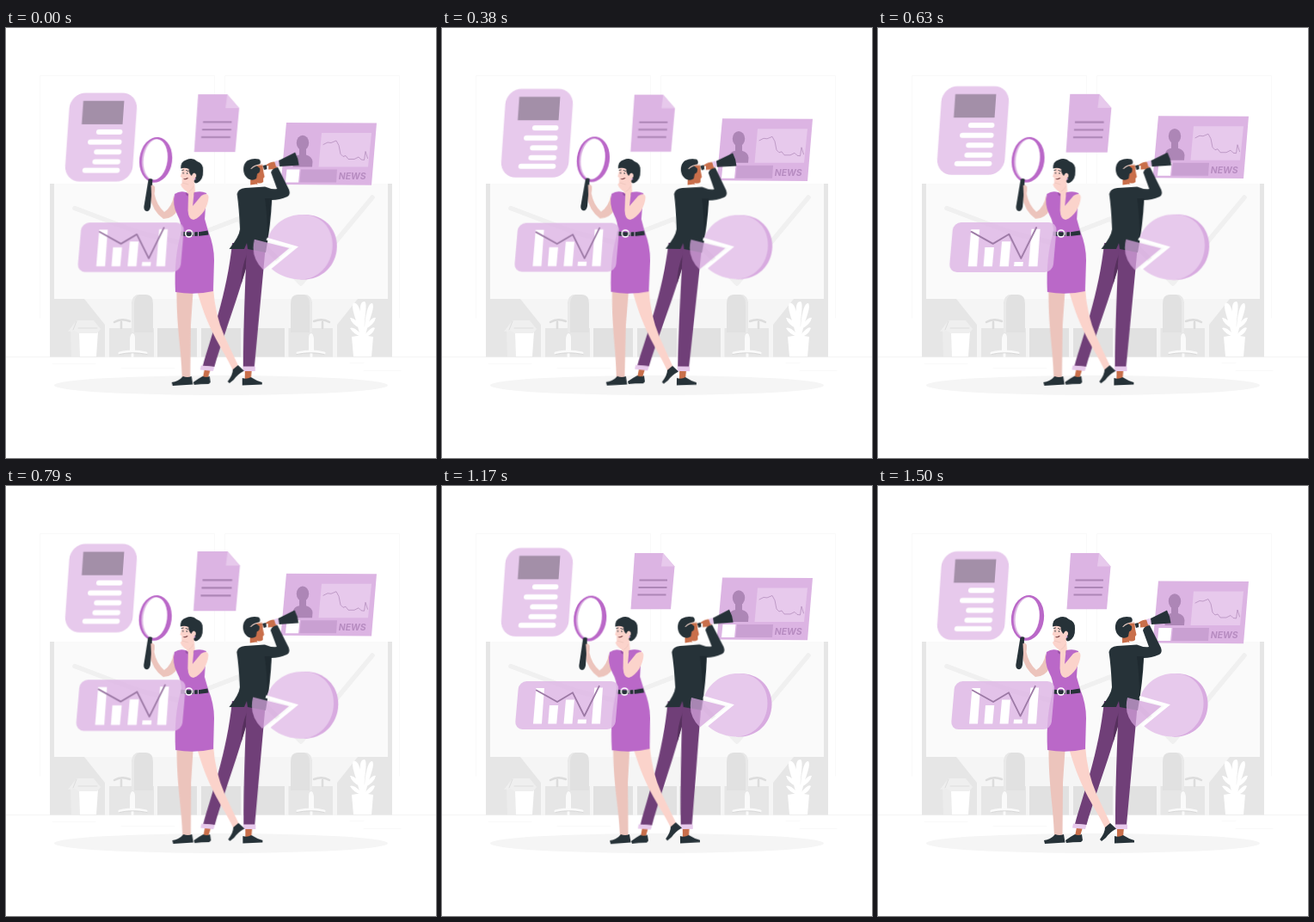
These frames come from a looping animation (500 by 500 pixels, 1.54 s). An HTML page:

```html
<!DOCTYPE html>
<html lang="en">
<head>
<meta charset="utf-8">
<title>Research</title>
<style>
  html, body { margin: 0; width: 100%; height: 100%; overflow: hidden; background: #fff; }
  svg { display: block; width: 100%; height: 100%; }

  .float, .beat, .sway { animation: 1540ms linear -40ms infinite; }
  .float { animation-name: float; }
  .beat { animation-name: beat; }
  .sway { animation-name: sway; }
  #sheet { transform-origin: 245px 110.7px; }
  #bars { transform-origin: 145.2px 255px; }
  #pie { transform-origin: 336px 254.7px; }
  #woman { transform-origin: 215px 271px; }
  #man { transform-origin: 279px 281px; }

  @keyframes float { 50% { transform: translateY(-9.5px); } }
  @keyframes beat {
    0%, 30%, 40%, 60%, 100% { transform: scale(1); }
    10%, 50% { transform: scale(1.1); }
  }
  @keyframes sway {
    25% { transform: rotate(1deg); }
    75% { transform: rotate(-1deg); }
  }

  .line { fill: none; stroke-linecap: round; stroke-linejoin: round; }
  .ink { fill: #263238; }
  .purple { fill: #ba68c8; }
  .light { fill: #e7c9ec; }
  .mid { fill: #dcb4e3; }
  .mauve { fill: #ad86b6; }
  .white { fill: #fff; }
  .skin { fill: #fbd3cb; }
  .shade { fill: #ecc4bc; }
  .tan { fill: #c96f4b; }
  .pants { fill: #703f78; }
  .g1 { fill: #fafafa; }
  .g2 { fill: #f5f5f5; }
  .g3 { fill: #e6e6e6; }
  .g4 { fill: #e1e1e1; }
</style>
</head>
<body>
<svg viewBox="0 0 500 500">
  <defs>
    <g id="chair">
      <path class="line" stroke="#dcdcdc" stroke-width="2.5" d="M126 342Q134 337 144 341M134 342V349"/>
      <path class="g4" d="M146 354V321Q147 310 155 310H163Q171 310 171 321V354Z"/>
      <path fill="#e9e9e9" d="M146 354V321Q147 310 154 310Q149 313 149 322V354Z"/>
      <path class="g1" d="M144 376V361Q145 355 147 355Q150 355 150 361V376Z"/>
      <path class="line" stroke="#fafafa" stroke-width="3" d="M132 378Q147 374 163 378M147 375V382"/>
      <path class="line" stroke="#d8d8d8" d="M132 379.5Q147 376 164 379.5"/>
    </g>
  </defs>

  <!-- office -->
  <g class="line" stroke="#f9f9f9">
    <path d="M39.500 337V55.500H242.500V181M254.500 181V55.500H457.500V337"/>
    <path d="M54 390.500H104M134 395.500H196M400 389.500H416M416 398.500H459"/>
    <path stroke="#f5f5f5" d="M0 382.500H500"/>
  </g>
  <rect class="g1" x="56" y="181" width="388" height="134"/>
  <rect class="g2" x="56" y="315" width="388" height="68"/>
  <path class="line" stroke="#f0f0f0" stroke-width="5.500" d="M80 209.500L155 238L200 249L270 222L343 297L426 197"/>
  <path class="g3" d="M56 315H91L115 345V382.500H56ZM444 315H409L385 345V382.500H444Z"/>
  <path class="g3" d="M120 349H172V382.500H120ZM328.500 349H380V382.500H328.500Z"/>
  <path class="g4" d="M176 349H222V382.500H176ZM227 349H273V382.500H227ZM276 349H324V382.500H276Z"/>
  <path class="g3" d="M51 181H56V382.500H51ZM444 181H449V382.500H444Z"/>
  <use href="#chair"/>
  <use href="#chair" transform="matrix(-1 0 0 1 502 0)"/>
  <path fill="#ececec" d="M75 352H86V382H76Z"/>
  <path class="white" d="M85 353H107L105 382H86Z"/>
  <path fill="#efefef" d="M82 340H102L110 350L106 355H85L80 352L72 353Z"/>
  <path class="line" stroke="#ddd" d="M82 341L78 351M84 349H106"/>
  <path class="white" d="M402 359Q414 356 427 359L425 382H404Z"/>
  <g class="white">
    <path d="M412 360C409 342 400 325 404 320C411 318 414 336 415 350C411 330 410 318 417 318C421 321 416 340 417 348C418 334 421 319 426 320C430 326 420 342 418 360Z"/>
    <path d="M413 347Q405 336 400 337Q402 345 413 350ZM412 355Q404 347 400 349Q404 356 413 359ZM418 347Q426 335 430 337Q428 345 418 350ZM418 356Q426 346 429 349Q426 357 418 359Z"/>
  </g>
  <ellipse class="g2" cx="250" cy="415.500" rx="194" ry="11.500"/>

  <!-- article -->
  <g class="float">
    <g transform="translate(110.500 127.500) skewX(-4)">
      <rect class="light" x="-39.300" y="-51.500" width="78.600" height="103" rx="18"/>
      <rect fill="#a38fa8" x="-23.500" y="-42.300" width="47.500" height="27.300"/>
      <path class="line" stroke="#fff" stroke-width="6" d="M-3 -6H21.500M-12 5.500H21.500M-4 17H22M-5 28.500H21.500M-16 38.500H21.500"/>
    </g>
  </g>

  <!-- news -->
  <g class="float">
    <path class="mid" d="M326 110.500L431 111L425 183.300L319.500 182.500Z"/>
    <ellipse class="mauve" cx="345" cy="134" rx="7.200" ry="8.800"/>
    <path class="mauve" d="M333.500 162L334 154Q335 149 341 148V140H349V148Q356 150 356.500 156L356 162Z"/>
    <path class="light" d="M367 122.500H425L421 162H363.500Z"/>
    <path class="line" stroke="#b48fbd" stroke-width=".8" d="M369 136L374 133.500L378 134L384 131.500L387 137L389 147L392 150L395 149L398 153L405 153L410 150.500L413 153.500L416.500 154L418 144L420.500 152"/>
    <path class="white" d="M326.500 165H341.500L340 180H325Z"/>
    <path fill="#c9a0d2" d="M343 165H385L384 180H341.500Z"/>
    <text x="386.800" y="176.900" fill="#b78cc1" font-family="Inter, 'Open Sans', sans-serif" font-size="10.400" font-weight="700" font-style="italic">NEWS</text>
  </g>

  <!-- sheet -->
  <g id="sheet" class="beat">
    <path class="mid" d="M224 78H257L270.500 93.500L266 143.300H219.500Z"/>
    <path class="light" d="M257 78L255 93.500H270.500Z"/>
    <path fill="none" stroke="#ad86b6" stroke-width="2" d="M229.500 109.500H262M228.500 118H261.500M227.500 126.500H260.500"/>
  </g>

  <!-- man -->
  <g id="man" class="sway">
    <path class="tan" d="M231 397H238L235 407H229ZM278 397H286L285 408H278Z"/>
    <path class="ink" d="M218 412Q225 407 229 405Q233 407 237 405L238 412L236 414Q226 414 219 415ZM275 407Q280 409 285 406Q291 410 298 412V414.500L275 415.500Z"/>
    <path class="pants" d="M263 250H283L280 272C275 300 256 348 242.500 394L229 393C238 360 257 310 263 250Z"/>
    <path fill="#56305d" d="M280.500 262Q273 280 273.500 298L279 280Z"/>
    <path class="pants" d="M280 250L302 252L289 394H276C276 350 278 302 280 250Z"/>
    <path class="light" d="M227 392.500L242.500 394L241 399L226 397.500ZM275.500 393.500H290V399H275.500Z"/>
    <path class="tan" d="M286 166L290 159L298.500 159.500L299 166L300.500 173L299 175V179Q296 181.500 292 180L293 186H284V174Z"/>
    <path class="ink" d="M283 176C274 172 274 158 281 154Q287 150.800 294 152.500Q297 155 295 158.500L291 160L295 163Q296 168 292 169.500L291 175Q287 178 283 176Z"/>
    <path class="line" stroke="#f0d2c8" stroke-width="1.100" d="M285 163.500Q289 159 298 158.500"/>
    <path class="white" d="M281 183L291 181.500L299 185.500L281 187Z"/>
    <path class="tan" d="M302 160Q305 156 311 155.500L318 156L317 160L313 164L305 164.500Z"/>
    <path class="ink" d="M268.500 193Q269.500 187 278 186L301 184.500Q309 188 315 187L308 168Q309 163 316 162L329 188Q331 194 327 196Q318 200 309 200Q308 228 302 261L281 257L280 250L277 257L259.500 257Q271 243 272 234Q271 210 268.500 193Z"/>
    <path fill="#1f2a30" d="M301 198H309L304 246Q304 220 301 198Z"/>
    <path class="light" d="M312 155L318 153.500L319 160L314 161.500Z"/>
    <path class="ink" d="M317 154L336 144.500Q340 152 340.500 159.500L318 161ZM298.500 160L302.500 159L303.500 164L300 165Z"/>
    <path class="white" d="M303 160.500L305 160V164H303.500Z"/>
  </g>

  <!-- woman -->
  <g id="woman" class="sway">
    <path class="shade" d="M198.500 300H218L215 345L214.500 407H205C204 370 198 350 198.500 300Z"/>
    <path class="skin" d="M222 300L241 302Q243 333 254 358L270.500 393L264 398C252 371 237 358 222 305Z"/>
    <path class="ink" d="M193 412Q201 411 206 405Q211 407 216 405L217.500 414.500L194 416ZM264 397L270 392L277 398.500Q269 403 265 409L260 413L258 411Q264 403 264 397Z"/>
    <path class="shade" d="M167 187Q170 179 173 185L172.500 193Q175 206 184 214Q193 208 195 195L200 211Q194 222 183 222Q170 213 167 195Z"/>
    <g transform="rotate(7 173.700 153)">
      <ellipse class="purple" cx="174" cy="153.300" rx="19" ry="26.500"/>
      <ellipse class="mid" cx="172.800" cy="153" rx="15" ry="24"/>
      <ellipse class="white" cx="173.600" cy="153" rx="13.800" ry="23.500"/>
    </g>
    <path class="ink" d="M165.500 176Q168 174.500 170.300 176L168 208Q167 213 164 213.300Q160 213 160.300 208Z"/>
    <path class="shade" d="M168.500 183Q172 183 173 188Q172 194 169 195Z"/>
    <path class="skin" d="M205 161Q204 169 202.700 173L204.500 174V179Q206 183 211 182L210 193H220L219 178L222 170L217 160Z"/>
    <path class="purple" d="M196 193Q202 189 209 191Q214 195 219 191Q227 189 233 192L231 222L235 236Q242 253 242 270L241 306Q219 311 197 307Q195 265 204 237Q204 226 199 217Q193 205 196 193Z"/>
    <path fill="#9b55a7" d="M209 191Q214 196 219 191L219 194Q214 198 209 194Z"/>
    <path class="ink" d="M203.500 236.500Q219 239 234.500 235.500L235.500 240.500Q219 243 203 241.500Z"/>
    <circle cx="212.700" cy="239" r="4" fill="none" stroke="#fff" stroke-width="1.600"/>
    <path stroke="#d7a4df" d="M218.500 237V242M223.500 237V242"/>
    <path class="skin" d="M227 195Q235 190 235.500 197C235 207 228 220 218 223Q212 223 211.500 212L212 191Q205 188 203 182Q206 178 211 179L217 178L219 187L217 207Z"/>
    <path class="ink" d="M203 163.500Q203 155 209 153.500Q217 150 222 155Q230 158 229 166Q229.500 176 222.500 180Q219 181.500 218.500 178L221 172Q220 167 217.500 169L215.500 172Q212 168 212.500 164Q208 162 203 163.500Z"/>
    <circle class="skin" cx="218.800" cy="171.500" r="2.200"/>
    <circle cx="219.500" cy="175.500" r="1" fill="#d7a4df"/>
    <path class="line" stroke="#263238" stroke-width=".9" d="M204.500 165.500L206.500 165M209.500 165.500L211.500 166.500M206 168V169.300M210.500 168.500V169.500"/>
    <path class="line" stroke="#7a4145" stroke-width="1.100" d="M207 175.500Q209 176.300 211 174.500"/>
    <path class="line" stroke="#ecc4bc" stroke-width=".8" d="M205 180L212 182M213 190Q217 188 218 184"/>
  </g>

  <!-- bar chart -->
  <g id="bars" class="beat">
    <rect fill="#dfb8e6" fill-opacity=".85" x="87" y="227" width="116.500" height="56" rx="9" transform="translate(145.200 255) skewX(-5) translate(-145.200 -255)"/>
    <path class="white" d="M109.400 235H119L116 276.500H106ZM125 255H135.200L133.200 276.500H123.300ZM144 248.500H154L151.500 276.500H141.500ZM158 271.500H168L167.500 276.300H157.500ZM177.300 234.500H187L184 276.500H174Z"/>
    <path class="line" stroke="#9c79a5" stroke-width="1.800" d="M109.800 237.500L134 251L152 240.300L165.500 267.500L182.700 232.800"/>
  </g>

  <!-- pie chart -->
  <g id="pie" class="beat">
    <path fill="#d8abe0" d="M345 218C367 217 383.500 232 383.500 254C383 277 365 293 342 291.500Z"/>
    <path class="light" d="M305 245C311 228 327 217.500 345 218C365 218 379 233 378.500 253C378 276 361 292 341 291.500C327 291 315 285 308 278L338 255Z"/>
    <path fill="none" stroke="#fff" stroke-width="3.200" d="M304 245.500L336.500 255L307 279"/>
    <path fill="#d4a3dc" fill-opacity=".75" d="M290 246L329.500 256L300 280.500Q285 266 290 246Z"/>
  </g>
</svg>
</body>
</html>
```
